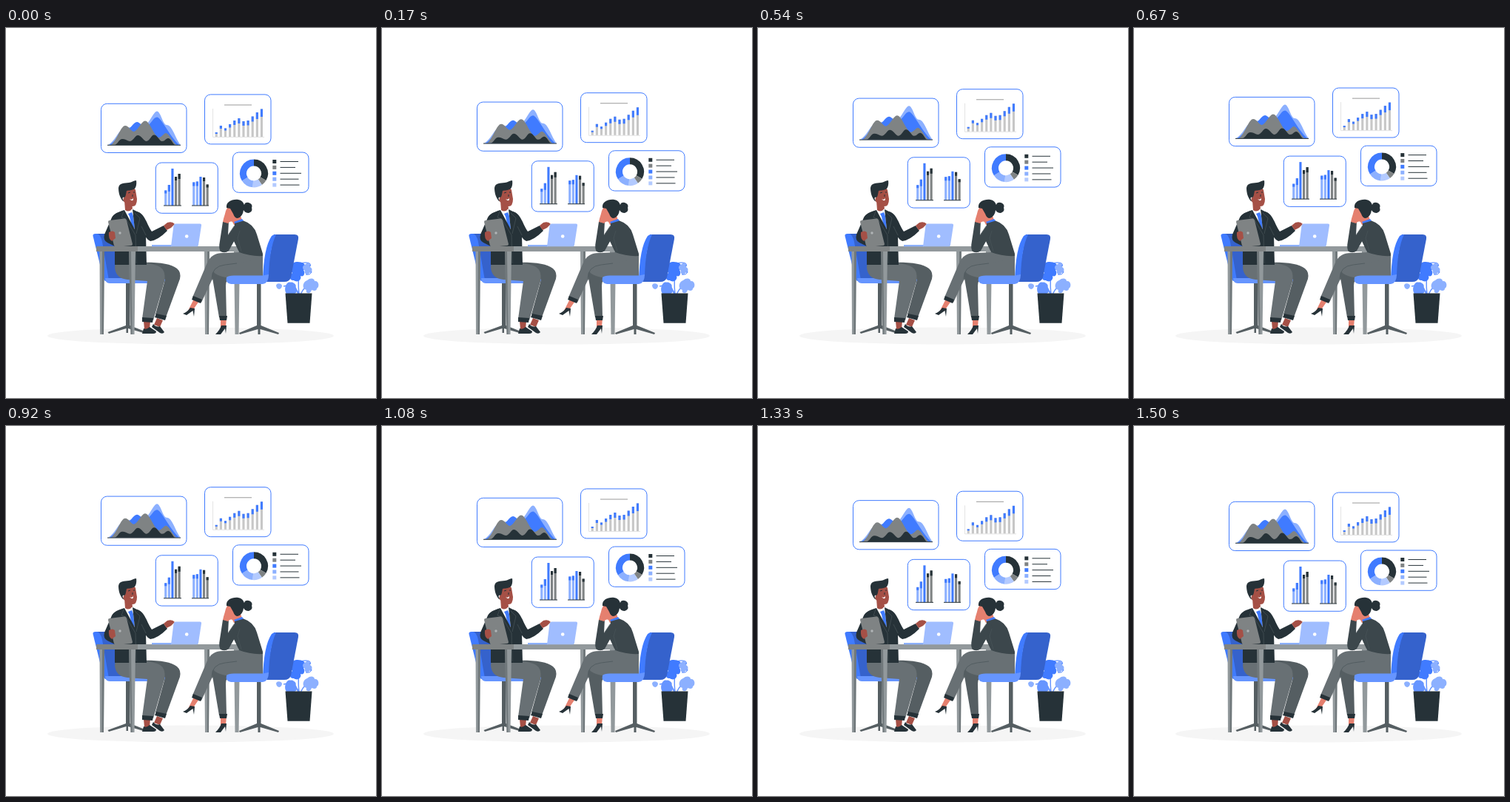
Animation, 500 px wide and 500 px high, one loop 1540 ms. Source, as an HTML page:

```html
<!DOCTYPE html>
<html lang="en">
<head>
<meta charset="utf-8">
<title>Business meeting</title>
<style>
  html, body { margin: 0; height: 100%; overflow: hidden; background: #fff; }
  svg { display: block; width: 100%; height: 100%; }
  .blue { fill: #407bff; } .deep { fill: #3562cc; } .sky { fill: #6695ff; }
  .pale { fill: #8cb0ff; } .ice { fill: #a0bdff; } .dark { fill: #263238; }
  .coat { fill: #3c474c; } .slate { fill: #555e62; } .cloth { fill: #687074; }
  .gray { fill: #7f8384; } .steel { fill: #92999c; } .silver { fill: #c7c7c7; }
  .brown { fill: #a55046; } .pink { fill: #e5806f; } .white { fill: #fff; }
  .line { fill: none; stroke: #263238; stroke-width: 1; }
  .thin { fill: none; stroke: #4a555a; stroke-width: .7; }
  .panel { fill: #fff; stroke: #407bff; stroke-width: 1; }
</style>
</head>
<body>
<svg viewBox="0 0 500 500">
  <ellipse cx="249.500" cy="416" rx="193.500" ry="11.500" fill="#f5f5f5"/>

  <g id="panels">
    <rect class="panel" x="128.500" y="102.300" width="115.500" height="66.200" rx="8"/>
    <path class="pale" d="M138 158C147 153 151 140 158 136L190 130C196 124 200 112.500 204 112.500C209 112.500 212 131 217 131C225 131 229 150 236 158Z"/>
    <path class="blue" d="M140 158C150 152 152 142 160 140C168 138 172 127 177 127C181 127 184 134 190 133C196 130 199 120.500 204 120.500C210 121 220 145 234 158Z"/>
    <path class="gray" d="M142 158C150 152 155 132 161 132C166 132 169 140 173 140C178 139 183 125.500 188 125.500C194 125.500 199 144 206 148C211 148 213 142 216 142C220 142 224 152 230 158Z"/>
    <path class="dark" d="M147 158C152 156 153 149 158 150C163 150 166 155 170 152C174 149 175 145 178 145C183 145 186 153 190 153C195 152 196 144.500 200 144.500C205 144.500 207 153 211 153C215 153 216 149 219 149C223 149 225 156 228 158Z"/>
    <path class="line" d="M137 158.300H236"/>

    <rect class="panel" x="268.500" y="89.900" width="89.500" height="67" rx="8"/>
    <path d="M295 104H332" stroke="#999"/>
    <path d="M279.500 109V147.500H349" fill="none" stroke="#ddd" stroke-width=".8"/>
    <g id="growth"></g>

    <rect class="panel" x="306.500" y="168" width="102.500" height="54.300" rx="8"/>
    <g id="donut" fill="none" stroke-width="9"></g>
    <g id="legend"></g>

    <rect class="panel" x="202.300" y="182" width="84" height="68.300" rx="8"/>
    <g id="columns"></g>
    <path class="line" d="M213 240H237M251 240H274"/>
  </g>

  <g id="plant">
    <path d="M396 360Q394 342 397 328M397 360Q388 345 375 349M398 360Q405 345 414 348M395 360Q390 346 386 344" fill="none" stroke="#6695ff" stroke-width="1.500"/>
    <path class="blue" d="M388 320C386 315 398 315 402 318C406 321 405 326 402 327C405 332 402 337 398 335C400 340 394 345 389 341C383 342 382 334 387 331C383 326 384 321 388 320Z"/>
    <path class="pale" d="M404 320C407 316 413 319 411 323C415 325 414 331 410 331C407 335 402 331 404 328C400 326 400 321 404 320ZM365 348C366 344 372 345 373 348C373 354 366 355 365 348Z"/>
    <path class="sky" d="M381 344C388 342 394 347 391 351C395 355 392 360 388 359C389 364 380 364 380 360C376 357 376 348 381 344Z"/>
    <path class="pale" d="M407 341C411 337 417 338 417 342C423 341 424 350 420 352C420 356 415 355 413 354C411 361 404 358 406 354C399 352 401 343 407 341Z"/>
    <path d="M397 320Q398 317 405 317Q413 317 411 322M405 333Q412 334 413 329" fill="none" stroke="#407bff"/>
    <path class="dark" d="M377.500 358.500H413.500L410.500 398.700H380.500Z"/>
  </g>

  <g id="leftChair">
    <path class="slate" d="M162 344H167.500V402L190 411L189 413L165 406V412H162.500V406L139 413L137.500 411L162 402Z"/>
    <path class="deep" d="M122 278H140Q146 278 148 284L160 335H213V340H138Z"/>
    <path class="blue" d="M117.500 281Q117 278 121 278H123Q128 279 130 289L139 341L134 342Q132 340 131 336Z"/>
    <path class="sky" d="M134 338H215Q217 345 208 345H140Q134 345 134 338Z"/>
  </g>

  <g id="man">
    <path class="brown" d="M186 396H195L194 407H187ZM204 392L212 395L208 404L200 401Z"/>
    <path class="dark" d="M186 406Q190 408 194 404L203 410Q203 413 199 413H184ZM199 400Q203 405 208 403L214 411Q212 414 208 412L197 404Z"/>
    <path class="slate" d="M175 317C205 316 222 318 231 325Q237 330 235 339L216 391L202 387L215 340L190 320Z"/>
    <path class="cloth" d="M149 316C170 318 190 316 204 321Q217 325 214 343L199 395L184 393L191 342L164 340Q147 338 147 322Z"/>
    <path class="dark" d="M184 391L199 392L198 398L184 397ZM203 386L217 389L215 395L201 391Z"/>
    <path class="white" d="M160 245L171 243L178 266L173 276Z"/>
    <path class="blue" d="M165 251L170 249L172 254L174 271L170 268L167 255Z"/>
    <path class="brown" d="M160 233L170 237L171 244Q166 250 161 246Z"/>
    <path class="brown" d="M161 222C161 216 174 215 175 219L177 231Q177 241 171 241Q164 241 161 236Q156 233 160 228Z"/>
    <path class="dark" d="M158 234C153 228 152 221 152 216C153 209 160 210 166 209C170 209 172 206 176 206C177 212 175 216 174 217C170 220 166 219 163 220C162 224 162 228 160 229C157 228 157 231 159 234Z"/>
    <path d="M167 231Q170 233 172 230Q172 236 167 231" class="white"/>
    <path class="line" stroke-width=".7" d="M165 223L168 222M172 222L174 222M171 225V228"/>
    <path class="dark" d="M160 246C150 249 146 251 143 256L133 279Q131 287 137 290L147 295V320H190L189 280C190 265 187 253 179 249L171 245L174 272Z"/>
    <path class="dark" d="M177 248C188 251 190 265 197 275L213 267L218 274Q205 287 195 288Q188 285 183 271Z"/>
    <path class="thin" d="M159 248L156 256L162 258L175 280L176 318M174 250L181 257L176 278M189 280L183 268"/>
    <path class="brown" d="M213 267L218 263Q225 261 228 265L223 270L217 273Z"/>
    <path class="gray" d="M138 262Q138 260 140 260L160 257.500Q162 257 163 260L171 292Q171 294 169 294L149 296Q147 296 146 294Z"/>
    <circle cx="154" cy="277" r="1.700" fill="#b0b5b7"/>
    <path class="brown" d="M139 276Q144 273 147 276L148 284L143 288Q138 285 139 276Z"/>
  </g>

  <g id="table">
    <path class="steel" d="M126.500 302H133L132 414H127ZM166 302H175L173.500 414H168.500ZM268 302H275L274 414H269ZM308 302H316L314.500 414H309.500Z"/>
    <path class="slate" d="M130 302H133L132 414H129.500ZM166 302H169L170.500 414H168.500ZM272 302H275L274 414H272Z" opacity=".55"/>
    <path class="steel" d="M122 295H314V302H122Z"/>
    <path class="gray" d="M122 295H178V302H122Z"/>
    <path class="pale" d="M197 293H224V295.300H197Z"/>
    <path class="ice" d="M229 264.500H262Q264.500 264.500 264 267L260 293Q260 295.300 257 295.300H223L226.500 267Q227 264.500 229 264.500Z"/>
    <circle class="white" cx="244.200" cy="281.500" r="2.300"/>
  </g>

  <g id="woman">
    <path class="pink" d="M254 366L261 369L252 382L245 384ZM290 392H298L297 404L290 408Z"/>
    <path class="dark" d="M239 386Q245 384 249 378L255 379L254 390L252.500 382L244 388ZM283 414Q289 408 291 402L298 402L297 413L296 406L290 414Z"/>
    <path class="cloth" d="M318 303L347 305V338H300Q284 334 278 341L264 371L252 364L272 317Q278 304 293 304Z"/>
    <path class="slate" d="M279 338C277 324 290 320 302 324L306 335Q297 339 297 348L298 391H288Z"/>
    <path class="cloth" d="M280 329C285 319 300 319 318 317L347 310V338H304Q285 336 280 329Z"/>
    <path class="thin" d="M278 339Q278 322 296 320L312 318"/>
    <path class="dark" d="M253 362L265 367L263 372L251 367ZM288 389H299L298 395H289Z"/>
    <path class="pink" d="M300 241L297 247L296 251L299 259L306 262L308 266L319 260L314 244Z"/>
    <path class="blue" d="M308 262L319 258L322 262L311 267Z"/>
    <path class="coat" d="M309 264L321 260.500Q335 265 339 279L347 305V308Q331 309 315 303L307 286Z"/>
    <path class="coat" d="M311 264Q317 267 316 274L301 301Q296 305 290 302Q287 298 289 288L293 262L301 261L300 280Z"/>
    <path class="pink" d="M293 262Q294 257 296 251Q298 248 300 251L303 256L307 258L305 261Q301 262 300 264Z"/>
    <path class="thin" d="M300 280L308 268M316 274L313 284L318 302"/>
    <path class="dark" d="M298 243C297 235 305 231 314 232Q320 233 322 239Q323 235 328 236Q334 238 332 243Q334 248 328 250Q323 250 321 246Q320 255 313 257Q309 257 307 251L303 244Z"/>
  </g>

  <g id="rightChair">
    <path class="slate" d="M339 344H344.500V402L369 412L368 414L343.500 407V414H340.500V407L316 414L315 412L339 402Z"/>
    <path class="deep" d="M362 279H390Q396 279 395 285L385 337Q383 343 376 343L350 343Z"/>
    <path class="blue" d="M359 281Q361 279 365 279Q356 298 355 335L347 342Q348 297 359 281Z"/>
    <path class="sky" d="M298 337Q300 334.500 308 334.500H347L355 333Q355 345 347 346H304Q296 345 298 337Z"/>
  </g>
</svg>
<script>
  const $ = id => document.getElementById(id);
  const rect = (cls, x, y, w, h) =>
    `<rect class="${cls}" x="${x}" y="${y}" width="${w}" height="${h}"/>`;
  // A bar standing on its base, with a differently coloured cap
  const bar = (x, top, base, cap, body, capClass) =>
    rect(body, x, top, 3.1, base - top) + rect(capClass, x, top, 3.1, cap);

  const growthTops = [141, 132, 135.5, 130, 125, 122, 126, 125, 119.5, 114, 109.5];
  const growthCaps = [2, 4, 3, 4.5, 6, 7, 6, 6.5, 7, 9, 10.5];
  $('growth').innerHTML = growthTops.map((top, i) =>
    bar(282.7 + i * 6.12, top, 147, growthCaps[i], 'silver', 'blue')).join('');

  const colors = ['#263238', '#7f8384', '#407bff', '#8cb0ff', '#b3caff'];
  // [start degree, end degree, colour index], clockwise from the top
  const slices = [[0, 120, 0], [120, 145, 1], [145, 185, 4], [185, 238, 3], [238, 360, 2]];
  const rim = deg => {
    const a = deg * Math.PI / 180;
    return `${335 + 14.5 * Math.sin(a)} ${196.4 - 14.5 * Math.cos(a)}`;
  };
  $('donut').innerHTML = slices.map(([from, to, c]) =>
    `<path d="M${rim(from)}A14.5 14.5 0 0 1 ${rim(to)}" stroke="${colors[c]}"/>`).join('');

  $('legend').innerHTML = [395, 391, 399, 395.5, 396.5].map((end, i) => {
    const y = 180.5 + i * 7.9;
    return `<rect x="360.3" y="${y - 2.5}" width="5" height="5" fill="${colors[i]}"/>
      <path class="line" d="M370.5 ${y}H${end}" stroke-width=".8"/>`;
  }).join('');

  const styles = [['pale', 'blue'], ['pale', 'blue'], ['blue', 'blue'], ['gray', 'dark'], ['gray', 'dark']];
  const columns = (x, tops, caps) => tops.map((top, i) =>
    bar(x + i * 4.6, top, 240, caps[i], ...styles[i])).join('');
  $('columns').innerHTML =
    columns(214.2, [219.5, 212, 190, 201, 197], [4, 9, 0, 5, 7]) +
    columns(252.2, [208.5, 207.5, 201, 202, 211.5], [5, 6, 0, 5, 4]);

  // The panels float up and down once in 36 steps; the loop holds one step more
  const LOOP = 1540, STEPS = 37, FLOAT = 36, RISE = 10;
  const lift = step => {
    const phase = (step + 0.5) / FLOAT % 1;
    return RISE * (1 - Math.abs(1 - 2 * phase));
  };
  const start = performance.now();
  function draw(now) {
    const time = Math.max(0, now - start) % LOOP;
    const step = Math.floor((time + 5) / LOOP * STEPS);
    $('panels').setAttribute('transform', `translate(0 ${lift(0) - lift(step)})`);
    requestAnimationFrame(draw);
  }
  draw(start);
</script>
</body>
</html>
```
